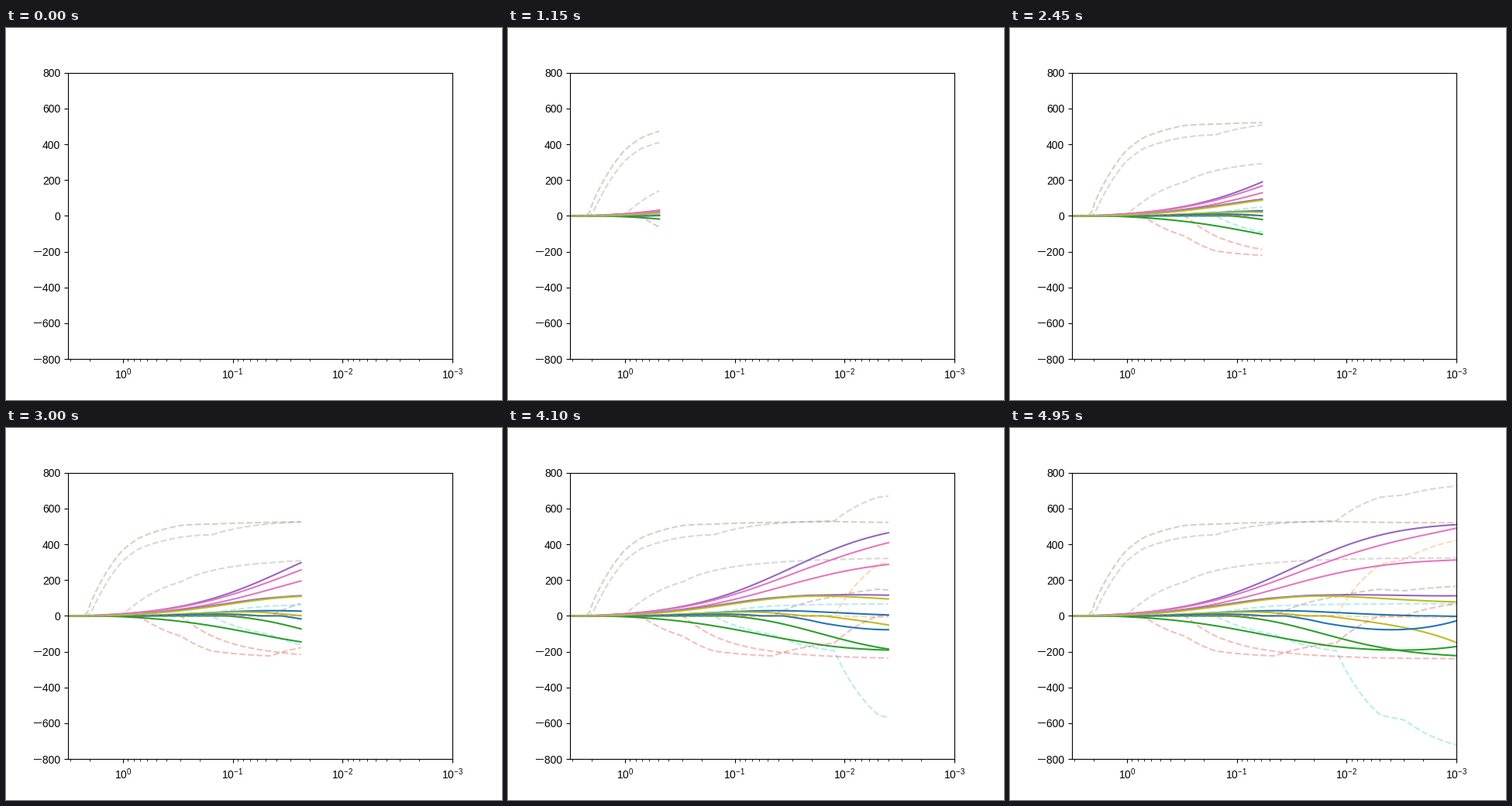
Animation of 640 by 480 pixels, one loop 5 s. Source, as a matplotlib script:

```python
import numpy as np
import matplotlib.pyplot as plt
from matplotlib.animation import FuncAnimation
from matplotlib.ticker import FuncFormatter

plt.rcParams["font.family"] = ["Liberation Sans", "Noto Sans CJK JP"]

SAMPLES = 442
STEPS = 100
RESPONSE_NORM = 1618.95
L1_RATIO = 0.9

# Diabetes data: correlations between the ten features (upper triangle, by row)
UPPER = [
    0.173737, 0.185085, 0.335428, 0.260061, 0.219243, -0.075181, 0.203841, 0.270774, 0.301731,
    0.088161, 0.241010, 0.035277, 0.142637, -0.379090, 0.332115, 0.149916, 0.208133,
    0.395411, 0.249777, 0.261170, -0.366811, 0.413807, 0.446157, 0.388680,
    0.242464, 0.185548, -0.178762, 0.257650, 0.393480, 0.390430,
    0.896663, 0.051519, 0.542207, 0.515503, 0.325717,
    -0.196455, 0.659817, 0.318357, 0.290600,
    -0.738493, -0.398577, -0.273697,
    0.617859, 0.417212,
    0.464669,
]
# ... and of each feature with the response
RESPONSE = [0.187889, 0.043062, 0.586450, 0.441482, 0.212022,
            0.174054, -0.394789, 0.430453, 0.565883, 0.382483]

gram = np.zeros((10, 10))
gram[np.triu_indices(10, 1)] = UPPER
gram += gram.T + np.eye(10)
moment = np.array(RESPONSE) * RESPONSE_NORM


def coef_paths(l1, l2, sweeps=4000):
    """Coordinate descent for all penalties at once."""
    w = np.zeros((10, len(l1)))
    for _ in range(sweeps):
        for j in range(10):
            rho = moment[j] - gram[j] @ w + w[j]
            w[j] = np.sign(rho) * np.maximum(np.abs(rho) - l1, 0) / (1 + l2)
    return w


alphas = np.logspace(0.5, -3, STEPS)
penalty = SAMPLES * alphas
both = coef_paths(np.concatenate([penalty * L1_RATIO, penalty]),
                  np.concatenate([penalty * (1 - L1_RATIO), 0 * penalty]))
enet, lasso = both[:, :STEPS], both[:, STEPS:]

fig, ax = plt.subplots(figsize=(6.4, 4.8), dpi=100)
ax.set_xscale("log")
ax.set_xlim(alphas[0], alphas[-1])
ax.set_ylim(-800, 800)
# wide minus sign
ax.yaxis.set_major_formatter(FuncFormatter(lambda v, _: f"{v:.0f}".replace("-", "\uff0d")))

curves = []
for i in range(10):
    solid, = ax.plot([], [], color=f"C{2 * i % 10}")
    dashed, = ax.plot([], [], "--", color=f"C{(2 * i + 1) % 10}", alpha=0.3)
    curves += [(solid, enet[i]), (dashed, lasso[i])]


def update(k):
    for line, path in curves:
        line.set_data(alphas[:k + 1], path[:k + 1])
    return [line for line, _ in curves]


anim = FuncAnimation(fig, update, frames=STEPS, interval=50, repeat=True, repeat_delay=0)
plt.show()
```
